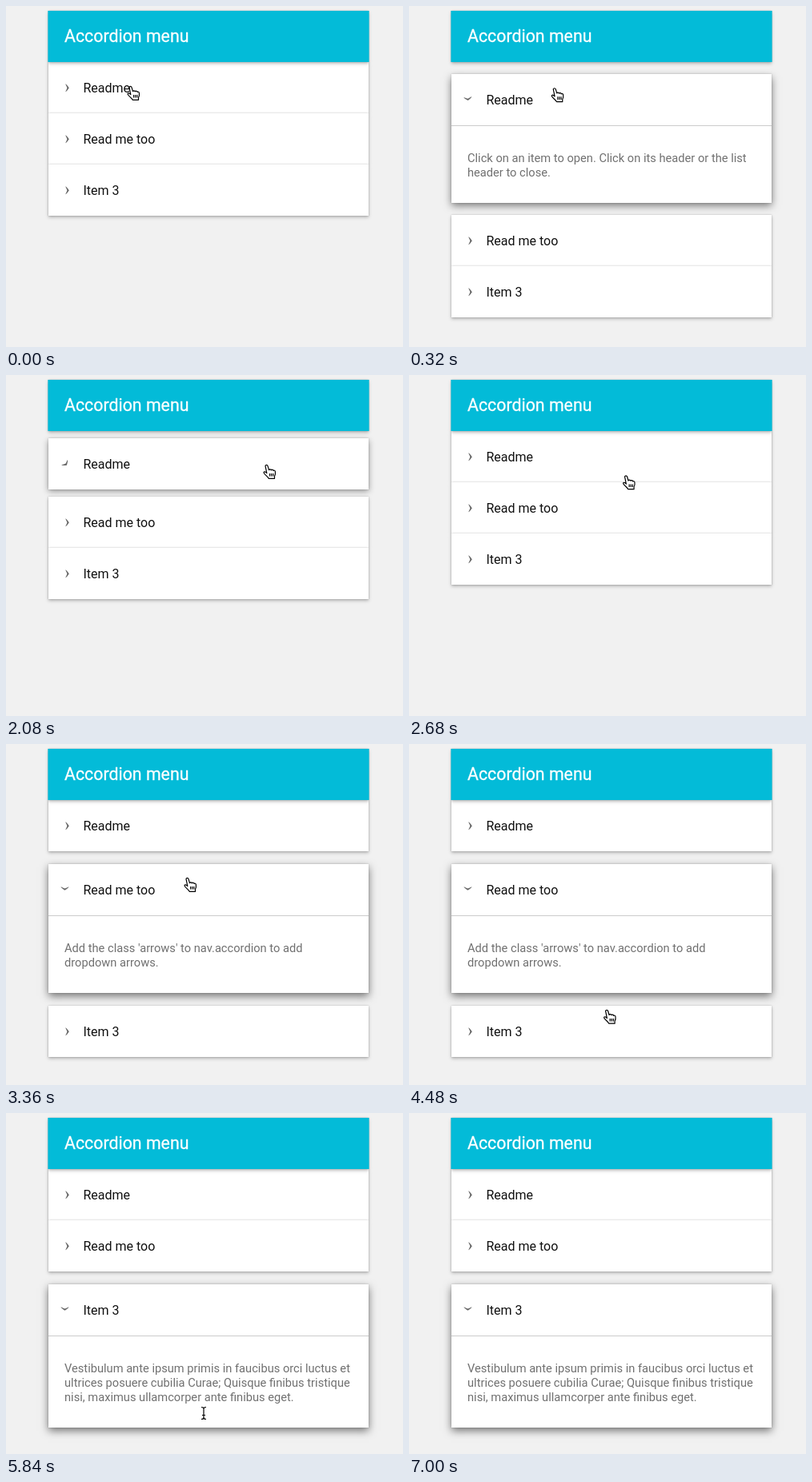
These frames come from a looping animation (496x426 px, 7.76 s). An HTML page:

```html
<!DOCTYPE html>
<html lang="en">
<head>
<meta charset="utf-8">
<title>Accordion menu</title>
<style>
  html, body { margin: 0; width: 100%; height: 100%; overflow: hidden; }
  body { position: relative; background: #f1f1f1; font: 12pt Roboto, sans-serif; color: #111; }
  nav { position: absolute; left: 53px; top: 6px; width: 400px; white-space: nowrap; }
  header {
    --edge: rgba(3,187,216,.6);
    position: relative; z-index: 1; height: 64px; padding-left: 20px; box-sizing: border-box;
    background: #03bbd8; color: #fff; font-size: 16pt; line-height: 64px;
    -webkit-text-stroke: .3px #fff;
    box-shadow: 1px 0 var(--edge), -1px 0 var(--edge), 0 0 2px rgba(0,0,0,.2), 0 2px 4px rgba(0,0,0,.26);
  }
  section {
    --open: 0;
    position: relative;
    margin: calc(var(--open) * 16px) 0;
    background: #fff;
    box-shadow:
      0 0 2px rgba(0,0,0,.2),
      0 calc(2px + var(--open) * 2px) calc(4px + var(--open) * 6px) rgba(0,0,0,calc(.26 + var(--open) * .26));
  }
  h2 { margin: 0; padding-left: 43.5px; height: 64px; font: inherit; line-height: 66px; }
  .arrow {
    position: absolute; left: 0; top: 0; width: 44px; height: 64px; overflow: visible; fill: #666;
    transform-origin: 22.9px 29.9px; transform: rotate(calc(var(--open) * 90deg));
  }
  p {
    margin: 0; padding: 31px 20px 29px; border-top: 1px solid #ccc;
    color: #707070; font-size: 11pt; line-height: 18px;
  }
  #cursor { position: absolute; left: 0; top: 0; width: 1px; height: 1px; overflow: visible; }
  #hand { fill: #fff; stroke: #000; stroke-width: 1.2; stroke-linejoin: round; }
  #beam { fill: none; stroke: #000; stroke-width: 1.2; }
  #beam .halo { stroke: #fff; stroke-width: 3; }
</style>
</head>
<body>
<nav>
  <header>Accordion menu</header>
  <section>
    <h2>Readme</h2>
    <p>Click on an item to open. Click on its header or the list<br>header to close.</p>
  </section>
  <section>
    <h2>Read me too</h2>
    <p>Add the class 'arrows' to nav.accordion to add<br>dropdown arrows.</p>
  </section>
  <section>
    <h2>Item 3</h2>
    <p>Vestibulum ante ipsum primis in faucibus orci luctus et<br>ultrices posuere cubilia Curae; Quisque finibus tristique<br>nisi, maximus ullamcorper ante finibus eget.</p>
  </section>
</nav>
<svg id="cursor">
  <g id="hand">
    <path d="M-2 1.6C-1.6 0 .5 0 1 1.6L2.5 6.6C3.2 5.4 5 5.6 5.3 6.8C6 5.8 7.8 6.2 8 7.5C8.8 6.8 10.2 7.3 10.4 8.6C10.8 11 10.6 12.5 9.5 14.4V17.3H2.2C1.5 15.5-1.8 13.2-3.4 11C-4.8 9.2-3 8.2-1.6 9.4L-.2 10.6Z"/>
    <path d="M3.6 11v3.6M5.7 11v3.6M7.8 11v3.6"/>
  </g>
  <g id="beam">
    <path class="halo" d="M-3-7.5Q0-7.5 0-5.5V5.5Q0 7.5-3 7.5M3-7.5Q0-7.5 0-5.5V5.5Q0 7.5 3 7.5"/>
    <path d="M-3-7.5Q0-7.5 0-5.5V5.5Q0 7.5-3 7.5M3-7.5Q0-7.5 0-5.5V5.5Q0 7.5 3 7.5M-2 2.5H2"/>
  </g>
</svg>
<script>
  const LOOP = 7760, STEP = 40, SLIDE = 160, GONE = 7000;

  const clicks = [
    { at: -SLIDE, open: -1 },
    { at: 200, open: 0 },
    { at: 2040, open: -1 },
    { at: 3160, open: 1 },
    { at: 5680, open: 2 }
  ];

  // Each move eases the cursor to a new place; bend bows the way there.
  const home = { x: 156, y: 100 };
  const moves = [
    { from: 200, to: 680, x: 324, y: 115 },
    { from: 960, to: 1040, x: 326, y: 112 },
    { from: 2360, to: 2960, x: 227, y: 167, bendY: -17 },
    { from: 3920, to: 4680, x: 245, y: 366, bendX: 10 },
    { from: 5680, to: 5840, x: 247, y: 375 },
    { from: 6840, to: 6960, x: 432, y: 119 }
  ];

  const sections = [...document.querySelectorAll('section')];
  const [cursor, hand, beam] = ['cursor', 'hand', 'beam'].map(id => document.getElementById(id));

  for (const s of sections) {
    s.insertAdjacentHTML('afterbegin',
      '<svg class="arrow"><path d="M21.2 27.4Q22.5 27.2 25.8 32.3Q22.5 37.4 21.2 37.2Q23 33.8 23.4 32.3Q23 30.8 21.2 27.4Z"/></svg>');
  }

  const part = (t, from, to) => Math.min(1, Math.max(0, (t - from) / (to - from)));
  const smooth = p => p * p * (3 - 2 * p);
  const easeOut = p => p * (2 - p);
  const mix = (a, b, p) => a + (b - a) * p;

  function cursorAt(t) {
    return moves.reduce((pos, { from, to, x, y, bendX = 0, bendY = 0 }) => {
      const p = smooth(part(t, from, to)), bow = 4 * p * (1 - p);
      return { x: mix(pos.x, x, p) + bow * bendX, y: mix(pos.y, y, p) + bow * bendY };
    }, home);
  }

  function draw(t) {
    const [last, before = last] = clicks.filter(c => c.at <= t).reverse();
    const p = easeOut(part(t, last.at, last.at + SLIDE));

    sections.forEach((s, i) => {
      const open = last.open === i;
      s.style.setProperty('--open', mix(+(before.open === i), +open, p));
      s.lastElementChild.style.display = open ? 'block' : 'none';
    });

    const { x, y } = cursorAt(t);
    const overText = last.open === 2 && y > 279;
    cursor.style.transform = `translate(${x}px, ${y}px)`;
    cursor.style.display = t < GONE ? 'block' : 'none';
    hand.style.display = overText ? 'none' : 'inline';
    beam.style.display = overText ? 'inline' : 'none';
  }

  const start = performance.now();
  function tick() {
    const t = (performance.now() - start) % LOOP;
    draw(Math.floor(t / STEP) * STEP);
    requestAnimationFrame(tick);
  }
  tick();
</script>
</body>
</html>
```
